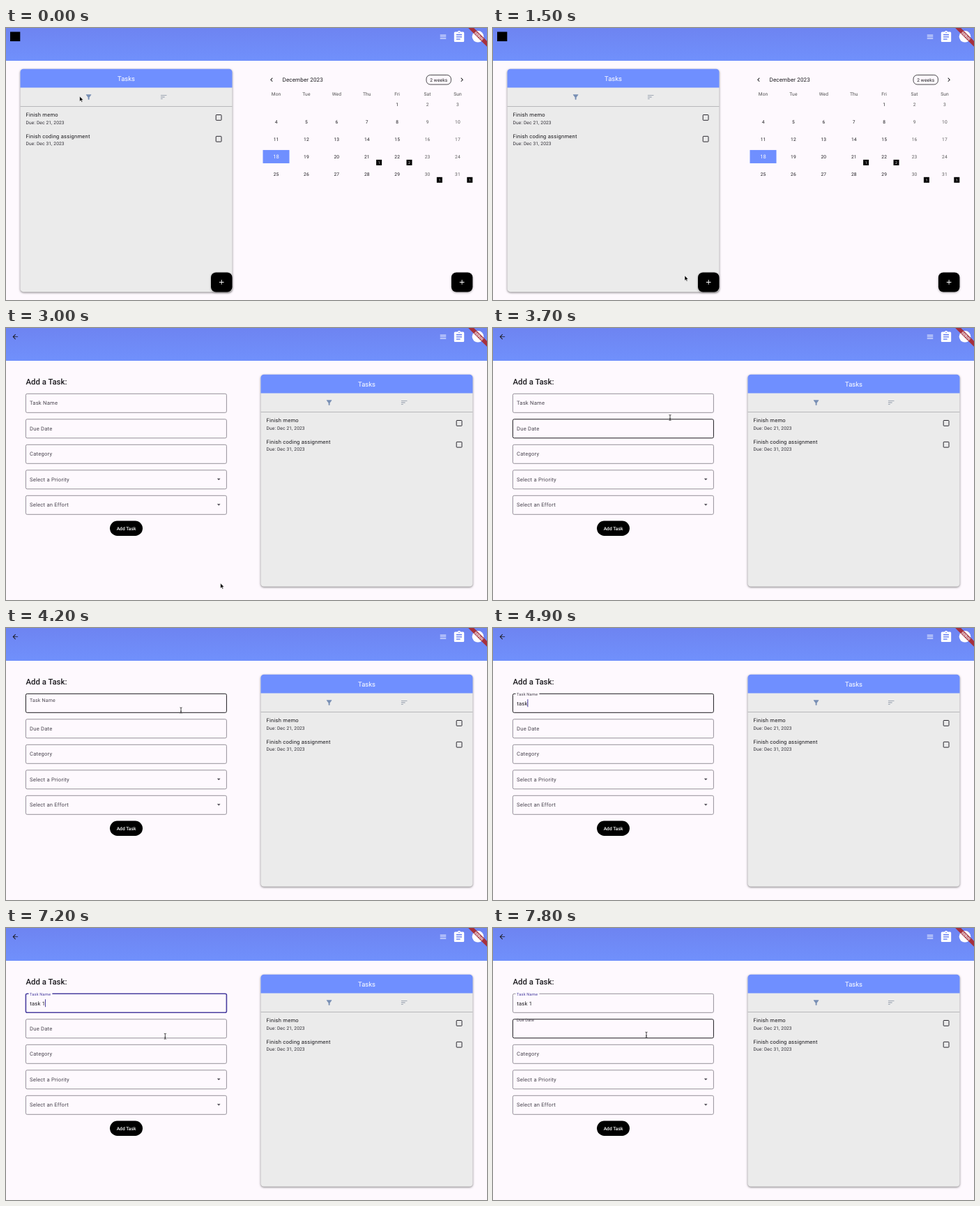
An HTML page that plays this animation: 690x390 px, repeating every 8000 ms.

```html
<!DOCTYPE html>
<html lang="en">
<head>
<meta charset="utf-8">
<title>Task planner</title>
<style>
  html, body { margin: 0; width: 100%; height: 100%; overflow: hidden; background: #fef9fe; }
  svg { display: block; }
  text { font-family: Roboto, Arial, sans-serif; white-space: pre; text-rendering: geometricPrecision; }
  .panel { filter: drop-shadow(0 1px 1.5px rgba(0, 0, 0, .5)); }
  .fab { filter: drop-shadow(0 1.5px 1.5px rgba(0, 0, 0, .35)); }
</style>
</head>
<body>
<svg id="stage" width="690" height="390" viewBox="0 0 690 390"></svg>
<script>
const LOOP = 8000, STEP = 100, UI = 0.475;
const BG = '#fef9fe', BLUE = '#6f8fff', INK = '#1c1b1f', MUTED = '#49454f', ACCENT = '#4a3fa0';
const stage = document.getElementById('stage');

// Material icons on a 24-unit grid
const ICON = {
  filter: 'M4.25 5.61C6.27 8.2 10 13 10 13v6c0 .55.45 1 1 1h2c.55 0 1-.45 1-1v-6s3.72-4.8 5.74-7.39A1 1 0 0 0 18.95 4H5.04c-.83 0-1.3.95-.79 1.61z',
  sort: 'M3 18h6v-2H3zM3 6v2h18V6zm0 7h12v-2H3z',
  menu: 'M3 18h18v-2H3zm0-5h18v-2H3zm0-7v2h18V6z',
  clipboard: 'M19 3h-4.18C14.4 1.84 13.3 1 12 1s-2.4.84-2.82 2H5c-1.1 0-2 .9-2 2v14c0 1.1.9 2 2 2h14c1.1 0 2-.9 2-2V5c0-1.1-.9-2-2-2zm-7 0c.55 0 1 .45 1 1s-.45 1-1 1-1-.45-1-1 .45-1 1-1zm2 14H7v-2h7zm3-4H7v-2h10zm0-4H7V7h10z',
  back: 'M20 11H7.83l5.59-5.59L12 4l-8 8 8 8 1.41-1.41L7.83 13H20z',
  drop: 'M7 9.5l5 5 5-5z',
  left: 'M15.41 7.41L14 6l-6 6 6 6 1.41-1.41L10.83 12z',
  right: 'M8.59 16.59L10 18l6-6-6-6-1.41 1.41L13.17 12z',
  plus: 'M19 13h-6v6h-2v-6H5v-2h6V5h2v6h6z'
};

// Pointer track: time, x, y, shape
const TRACK = [
  [0, 105.7, 98, 'arrow'], [1200, 105.7, 98, 'arrow'], [1300, 125, 125, 'arrow'],
  [1500, 275, 355, 'arrow'], [1600, 292, 378, 'arrow'], [1700, 292, 378, 'arrow'],
  [2000, 308, 366, 'hand'], [2900, 308, 366, 'hand'], [3000, 307.7, 366, 'arrow'],
  [3300, 285, 270, 'arrow'], [3500, 262, 160, 'beam'], [3700, 254, 128.5, 'beam'],
  [3800, 253, 127.8, 'beam'], [3900, 251.5, 124, 'beam'], [4100, 251, 118, 'beam'],
  [4500, 251, 118, ''], [7100, 232, 167, 'beam'], [7200, 228.3, 155.3, 'beam'],
  [7400, 223, 154, 'beam'], [7700, 220, 153.2, 'beam']
];
const TYPED = [[0, ''], [4500, 't'], [4700, 'ta'], [4900, 'task'], [6600, 'task '], [6900, 'task 1']];

const clamp = v => Math.max(0, Math.min(1, v));
const within = (t, a, b) => t >= a && t < b;

function text(str, x, y, size, { fill = INK, gap = 0, anchor = 'start', weight = 400, id = '' } = {}) {
  const shift = anchor === 'middle' ? gap / 2 : 0;
  return `<text ${id && `id="${id}"`} x="${x + shift}" y="${y}" font-size="${size}" fill="${fill}" letter-spacing="${gap}" text-anchor="${anchor}" font-weight="${weight}">${str}</text>`;
}
const rect = (x, y, w, h, fill, r = 0, extra = '') =>
  `<rect x="${x}" y="${y}" width="${w}" height="${h}" rx="${r}" fill="${fill}" ${extra}/>`;
const icon = (name, cx, cy, fill, s = UI) =>
  `<path d="${ICON[name]}" fill="${fill}" transform="translate(${cx - 12 * s} ${cy - 12 * s}) scale(${s})"/>`;

function header(corner) {
  return `<defs><linearGradient id="bar" x2="0" y2="1"><stop stop-color="#6e84f1"/><stop offset="1" stop-color="#7090fc"/></linearGradient></defs>`
    + rect(0, 0, 690, 390, BG) + rect(0, 0, 690, 47, 'url(#bar)') + corner
    + icon('menu', 627, 12.6, '#fff') + icon('clipboard', 650, 12.8, '#fff', 0.8)
    + '<circle cx="677" cy="12.3" r="8.3" fill="#fff"/>'
    + `<g transform="translate(690) rotate(45)">${rect(-20, 13.3, 40, 5.7, '#a5303c')}`
    + text('DEBUG', 0, 17.9, 4.85, { fill: '#fff', anchor: 'middle', weight: 900 }) + '</g>';
}

function taskPanel(dx, dy, h) {
  const task = (name, due, y) => text(name, 28.5, y, 7.6, { gap: 0.24 })
    + text('Due: ' + due, 28.5, y + 10.4, 6.65, { gap: 0.12, fill: '#333138' })
    + rect(301.2, y - 2.6, 7.8, 7.8, 'none', 0.7, 'stroke="#2b2930" stroke-width="1"');
  return `<g transform="translate(${dx} ${dy})">`
    + rect(20.5, 58.8, 304, h, '#ebebeb', 4.5, 'class="panel"')
    + `<path d="M20.5 85.5V63.3a4.5 4.5 0 0 1 4.5-4.5H320a4.5 4.5 0 0 1 4.5 4.5V85.5z" fill="${BLUE}"/>`
    + text('Tasks', 172.5, 75.8, 9.5, { fill: '#fff', anchor: 'middle' })
    + icon('filter', 118.6, 99, '#788fb4') + icon('sort', 226.2, 99, '#8792a3')
    + rect(20.5, 112, 304, 0.9, '#b3b3b5')
    + task('Finish memo', 'Dec 21, 2023', 127.1)
    + task('Finish coding assignment', 'Dec 31, 2023', 157.9) + '</g>';
}

const fab = (x, fill) => rect(x, 350.5, 30.5, 28, fill, 7.2, 'class="fab"') + icon('plus', x + 15.2, 364.4, '#fff');

function calendar() {
  const colX = c => 387.5 + 43.4 * c;
  const badges = { 21: 1, 22: 2, 30: 1, 31: 1 };
  const label = (str, c, y, fill, size = 6.65) => text(str, colX(c), y, size, { fill, gap: 0.12, anchor: 'middle' });
  let out = icon('left', 381, 74.2, INK) + icon('right', 654, 74.2, INK)
    + text('December 2023', 396.5, 77.1, 8.07, { gap: 0.12 })
    + rect(603, 67.4, 35.4, 13.6, 'none', 5.7, `stroke="${INK}" stroke-width=".8"`)
    + text('2 weeks', 608.2, 76.6, 6.65, { gap: 0.12 });
  'Mon Tue Wed Thu Fri Sat Sun'.split(' ').forEach((d, c) => out += label(d, c, 96.8, '#4f4f4f'));
  for (let day = 1; day <= 31; day++) {
    const cell = day + 3, c = cell % 7, y = 109.7 + 24.95 * Math.floor(cell / 7);
    if (day === 18) out += rect(368.5, y - 9.6, 38, 19, BLUE) + label(day, c, y + 2.7, '#fafafa', 7.6);
    else out += label(day, c, y + 2.3, c > 4 ? '#5a5a5a' : INK);
    if (badges[day]) {
      out += rect(colX(c) + 13.4, y + 4.3, 8, 8, '#000')
        + text(badges[day], colX(c) + 17.4, y + 10.2, 5.2, { fill: '#fff', anchor: 'middle' });
    }
  }
  return out;
}

function field(label, row, { lift = 0, border = '#7b7780', width = 0.8, tint = MUTED } = {}) {
  const y = 94.3 + 36.5 * row, size = 7.6 - 1.9 * lift;
  return rect(28.4, y, 288, 27, 'none', 2, `stroke="${border}" stroke-width="${width}"`)
    + (lift === 1 ? rect(32.5, y - 2, label.length * 3.4 + 3.3, 4, BG) : '')
    + text(label, 34, y + 15.9 - 13.6 * lift, size, { gap: size / 32, fill: tint });
}

function form(t) {
  const typed = TYPED.filter(k => k[0] <= t).pop()[1];
  const name = { lift: clamp((t - 4150) / 150) }, due = { lift: clamp((t - 7660) / 150) };
  if (within(t, 4100, 7100)) Object.assign(name, { border: INK, width: 1 });
  if (within(t, 7100, 7700)) Object.assign(name, { border: ACCENT, width: 1.6 });
  if (t >= 7100) name.tint = ACCENT;
  if (within(t, 3600, 3900) || t >= 7300) Object.assign(due, { border: INK, width: 1 });
  const caret = within(t, 4300, 5400) || within(t, 5900, 6400) || within(t, 6600, 7700);
  return text('Add a Task:', 28.5, 80.5, 11.4, { weight: 500 })
    + field('Task Name', 0, name) + field('Due Date', 1, due) + field('Category', 2)
    + field('Select a Priority', 3) + field('Select an Effort', 4)
    + icon('drop', 305.2, 217, MUTED) + icon('drop', 305.2, 253.5, MUTED)
    + text(typed, 34.2, 110.6, 7.6, { gap: 0.24, id: 'typed' })
    + (caret ? rect(34.2, 102.2, 1, 11, ACCENT, 0, 'id="caret"') : '')
    + rect(149, 276.6, 47, 21.3, '#000', 10.65)
    + text('Add Task', 172.5, 289.7, 6.65, { fill: '#fff', gap: 0.05, anchor: 'middle', weight: 500 });
}

function pointer(t) {
  const i = TRACK.findLastIndex(k => k[0] <= t);
  const [t0, x0, y0, shape] = TRACK[i], [t1, x1, y1] = TRACK[i + 1] || [LOOP, x0, y0];
  if (!shape) return '';
  // After pausing in the name field the pointer stays put until it is hidden
  const p = (t - t0) / (t1 - t0), x = x0 + (x1 - x0) * p, y = y0 + (y1 - y0) * p;
  const art = {
    arrow: '<path d="M0 0V7.2L1.7 5.7 2.8 8.2 4 7.7 2.9 5.3H5.1z" fill="#000" stroke="#fff" stroke-width=".5"/>',
    hand: '<path d="M-.7 .3Q0-.5 .6 .3V2.8L2.9 3.4Q3.5 3.7 3.3 4.6L2.7 7.5H-1L-2.6 4.9Q-2.4 4-.7 5z" fill="#fff" stroke="#000" stroke-width=".6"/>',
    beam: '<path d="M-1.5-4Q0-4 0-3.1Q0-4 1.5-4M0-3.1V3.1M-1.5 4Q0 4 0 3.1Q0 4 1.5 4M-.8 1.4H.8" fill="none" stroke="#222" stroke-width=".85"/>'
  };
  return `<g transform="translate(${x} ${y})">${art[shape]}</g>`;
}

function draw(t) {
  const home = t < 3000;
  const fabFill = t < 2500 ? '#000' : t < 2600 ? '#141417' : '#222126';
  stage.innerHTML = home
    ? header(rect(6, 5.5, 14.3, 13.5, '#000')) + taskPanel(0, 0, 319.6) + fab(294, fabFill)
      + calendar() + fab(638.9, '#000') + pointer(t)
    : header(icon('back', 13.3, 12.6, INK)) + form(t) + taskPanel(345, 8, 304) + pointer(t);
  const caret = document.getElementById('caret');
  if (caret) caret.setAttribute('x', 34 + document.getElementById('typed').getComputedTextLength());
}

let shown = -1;
function tick() {
  const t = Math.min(Math.floor(performance.now() % LOOP / STEP) * STEP, 7800);
  if (t !== shown) draw(shown = t);
  requestAnimationFrame(tick);
}
tick();
</script>
</body>
</html>
```
